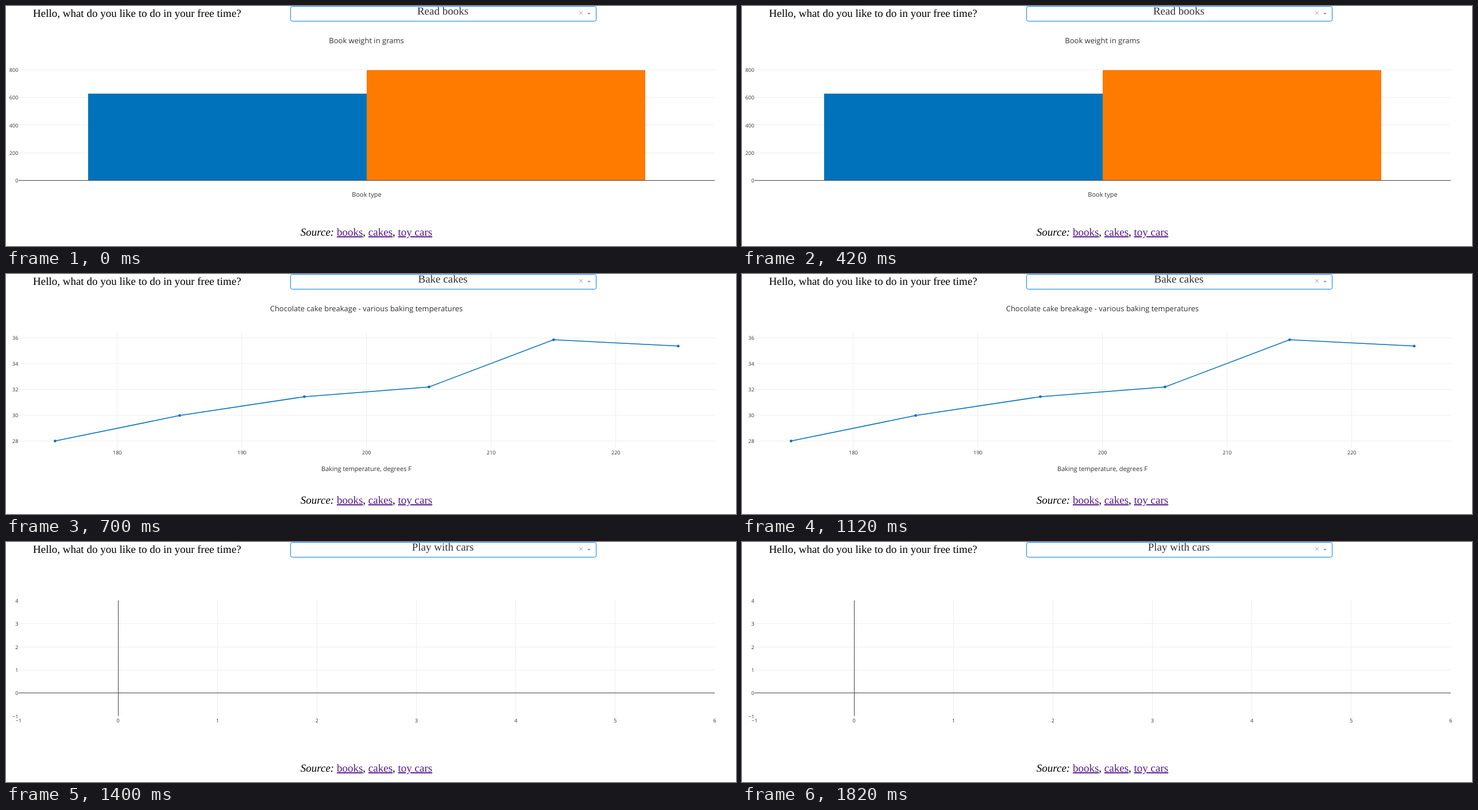
Animation, 1271 px wide and 419 px high, one loop 2.1 s. Source, as an HTML page:

```html
<!DOCTYPE html>
<html lang="en">
<head>
<meta charset="utf-8">
<title>Free time charts</title>
<style>
  html, body { margin: 0; width: 100%; height: 100%; overflow: hidden; background: #fff; }
  svg { display: block; width: 1271px; height: 419px; text-rendering: geometricPrecision; }
  .serif { font: 19px "Liberation Serif", "Times New Roman", serif; }
  .mid { text-anchor: middle; }
  .link { fill: #551a8b; text-decoration: underline; }
  .chart { font-family: "Open Sans", sans-serif; fill: #333; }
  .title { font-size: 13px; }
  .axis { font-size: 11px; }
  .tick { font-size: 9px; }
  .grid { stroke: #eee; }
  .zero { stroke: #444; }
  .view { visibility: hidden; animation: show 2100ms step-end infinite; }
  #cakes { animation-delay: -1400ms; }
  #cars { animation-delay: -700ms; }
  @keyframes show {
    0% { visibility: visible; }
    33.3333%, 100% { visibility: hidden; }
  }
</style>
</head>
<body>
<svg viewBox="0 0 1271 419">
  <text class="serif" x="47" y="19">Hello, what do you like to do in your free time?</text>

  <rect x="495.5" y="0.5" width="532" height="26" rx="3" fill="#fff" stroke="#007eff"/>
  <text class="serif mid" x="1001" y="16.5" fill="#999" style="font-size:15px">×</text>
  <path d="M1012 12h6l-3 3z" fill="#999"/>

  <text class="serif mid" x="627.5" y="401"><tspan font-style="italic">Source:</tspan> <tspan class="link">books</tspan>, <tspan class="link">cakes</tspan>, <tspan class="link">toy cars</tspan></text>

  <g class="view" id="books">
    <text class="serif mid" x="760.5" y="15" fill="#333">Read books</text>
    <g class="chart">
      <text class="title mid" x="627.5" y="65">Book weight in grams</text>
      <g class="axes"></g>
      <rect x="143" y="153" width="485" height="151" fill="#0072bb"/>
      <rect x="628" y="112" width="485" height="192" fill="#ff7b00"/>
      <path class="zero" d="M22 304.5H1234"/>
      <text class="axis mid" x="628" y="333">Book type</text>
    </g>
  </g>

  <g class="view" id="cakes">
    <text class="serif mid" x="760.5" y="15" fill="#333">Bake cakes</text>
    <g class="chart">
      <text class="title mid" x="627.5" y="65">Chocolate cake breakage - various baking temperatures</text>
      <g class="axes"></g>
      <g id="series" fill="#0072bb"></g>
      <text class="axis mid" x="627.5" y="344">Baking temperature, degrees F</text>
    </g>
  </g>

  <g class="view" id="cars">
    <text class="serif mid" x="760.5" y="15" fill="#333">Play with cars</text>
    <g class="chart">
      <g class="axes"></g>
      <path class="zero" d="M22 263.5H1234M195.5 102V304"/>
    </g>
  </g>
</svg>
<script>
  const LEFT = 22, RIGHT = 1234, TOP = 102, BOTTOM = 304;
  const crisp = v => Math.floor(v) + 0.5;
  const label = (x, y, value, anchor) =>
    `<text class="tick" x="${x}" y="${y}" text-anchor="${anchor}">${String(value).replace('-', '−')}</text>`;

  // An axis lists `count` ticks from value `from` by `step`, placed from `at` by `gap` pixels.
  const ticks = ({ from, step, at, gap, count }) =>
    Array.from({ length: count }, (_, i) => ({ value: from + i * step, pos: at + i * gap }));

  function drawAxes(id, yAxis, xAxis) {
    let lines = '', labels = '';
    for (const { value, pos } of ticks(yAxis)) {
      if (pos > TOP + 1 && pos < BOTTOM) lines += `M${LEFT} ${crisp(pos)}H${RIGHT}`;
      labels += label(21.3, pos + 3.5, value, 'end');
    }
    for (const { value, pos } of xAxis ? ticks(xAxis) : []) {
      if (pos > LEFT + 1 && pos < RIGHT) lines += `M${crisp(pos)} ${TOP}V${BOTTOM}`;
      labels += label(pos, 315, value, 'middle');
    }
    document.querySelector(`#${id} .axes`).innerHTML = `<path class="grid" d="${lines}"/>${labels}`;
  }

  drawAxes('books', { from: 0, step: 200, at: 304.4, gap: -48.2, count: 5 });
  drawAxes('cakes',
    { from: 28, step: 2, at: 291.6, gap: -45, count: 5 },
    { from: 180, step: 10, at: 193.8, gap: 217, count: 5 });
  drawAxes('cars',
    { from: -1, step: 1, at: 304.2, gap: -40.4, count: 6 },
    { from: -1, step: 1, at: 22, gap: 173.15, count: 8 });

  const points = [291.6, 247.1, 214.2, 197.2, 114.8, 125.8].map((y, i) => [85.4 + 217 * i, y]);
  document.getElementById('series').innerHTML =
    `<polyline points="${points.join(' ')}" fill="none" stroke="#0072bb" stroke-width="1.55"/>` +
    points.map(([x, y]) => `<circle cx="${x}" cy="${y}" r="2.35"/>`).join('');
</script>
</body>
</html>
```
